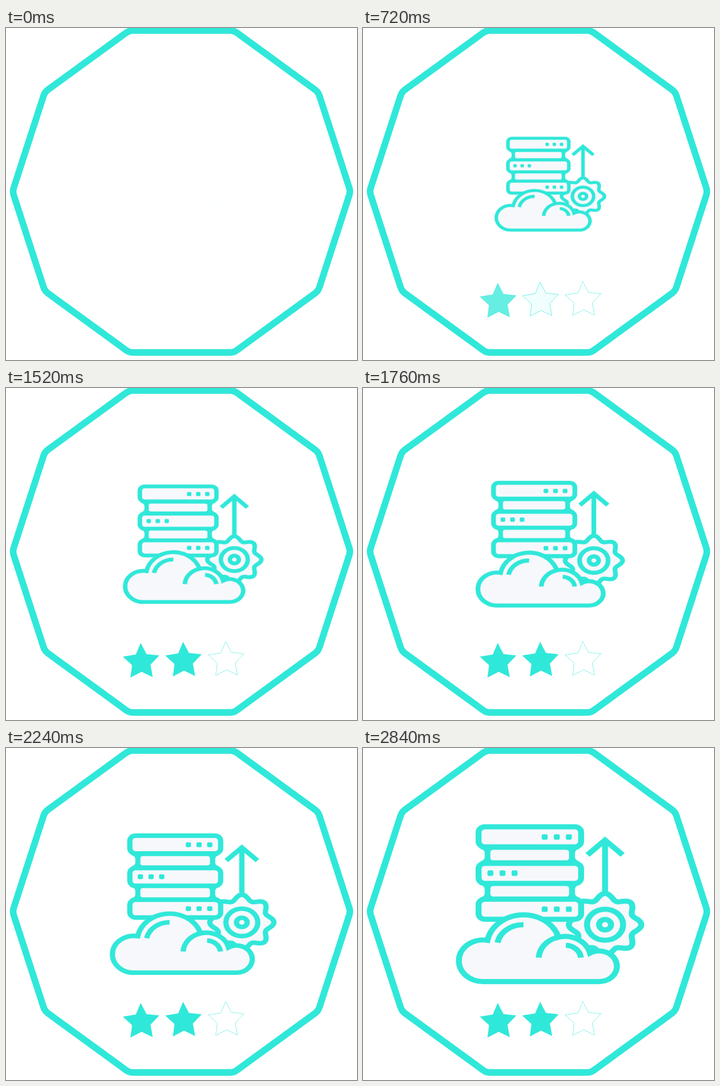
These frames come from a looping animation (770x727 px, 2.88 s). An HTML page:

```html
<!DOCTYPE html>
<html lang="en">
<head>
<meta charset="utf-8">
<title>Cloud server badge</title>
<style>
  html, body { margin: 0; width: 100%; height: 100%; overflow: hidden; background: #fff; }
  svg { display: block; width: 100vw; height: 100vh; --teal: #30e8d9; --pale: #f7f8fc; }

  .line { fill: none; stroke: var(--teal); stroke-width: 13; }
  .shape { fill: var(--pale); stroke: var(--teal); stroke-width: 13; }
  .solid { fill: var(--teal); }
  .pale { fill: var(--pale); }
  #frame { stroke-width: 14.5; }

  .icon { animation: grow 2880ms linear infinite, appear 2880ms linear infinite; }
  @keyframes grow {
    from { transform: translate(412px, 342px) scale(.4547, .391); }
    to   { transform: translate(412px, 342px) scale(1.0077, .8666); }
  }
  @keyframes appear { 0% { opacity: 0; } 7% { opacity: 1; } }

  .star { fill: var(--teal); fill-opacity: 0; stroke: var(--teal); stroke-width: .8; }
  .star.a { animation: outlineA 2880ms linear infinite, fillA 2880ms linear infinite; }
  .star.b { animation: outlineB 2880ms linear infinite, fillB 2880ms linear infinite; }
  .star.c { animation: outlineC 2880ms linear infinite; stroke-width: .7; }
  @keyframes outlineA { 0% { stroke-opacity: 0; } 10.4% { stroke-opacity: 1; } }
  @keyframes outlineB { 0%, 2.8% { stroke-opacity: 0; } 13.2% { stroke-opacity: 1; } }
  @keyframes outlineC { 0%, 8.3% { stroke-opacity: 0; } 20.8%, 100% { stroke-opacity: 1; } }
  @keyframes fillA { 0%, 17.4% { fill-opacity: 0; } 27.8%, 100% { fill-opacity: 1; } }
  @keyframes fillB { 0%, 24.3% { fill-opacity: 0; } 34.7%, 100% { fill-opacity: 1; } }
</style>
</head>
<body>
<svg viewBox="0 0 770 727" preserveAspectRatio="none">
  <defs>
    <path id="star" d="M295.5 559 308 583 335.5 586 316.5 606 321.5 632.5 297.5 621 273.5 633.5 277 607 257 588.5 285 584Z"/>
    <rect id="box" x="-158.5" y="-25.6" width="225" height="51.2" rx="14"/>
    <g id="dots">
      <rect x="-33" y="-7" width="13" height="14" rx="4"/>
      <rect x="-6.5" y="-7" width="13" height="14" rx="4"/>
      <rect x="20" y="-7" width="13" height="14" rx="4"/>
    </g>
    <g id="link">
      <path class="solid" d="M-160-16Q-145-16-145-4V4Q-145 16-160 16H68Q53 16 53 4V-4Q53-16 68-16Z"/>
      <rect class="pale" x="-132.5" y="-13.4" width="172.5" height="26.8" rx="6"/>
    </g>
  </defs>

  <path id="frame" class="line"/>

  <g class="icon">
    <path class="pale" d="M-10 30H60V85H-10Z"/>
    <path class="line" d="M119 -20V-160M80.5 -125.5 119 -163 157.5 -125.5"/>
    <g transform="translate(119 52.3)">
      <path id="gear" class="shape"/>
      <circle class="line" r="39.5"/>
      <circle class="line" r="13.2"/>
    </g>

    <use href="#box" class="shape" y="-171.5"/>
    <use href="#box" class="shape" y="-78.5"/>
    <use href="#box" class="shape" y="12.8"/>
    <use href="#link" y="-125"/>
    <use href="#link" y="-33"/>
    <use href="#dots" class="solid" x="13" y="-171"/>
    <use href="#dots" class="solid" x="-106" y="-79"/>
    <use href="#dots" class="solid" x="13" y="12.8"/>

    <path class="shape" d="M-139 92A53 53 0 1 0-145.5 197H106.5A39 39 0 1 0 86 124.5A56.6 56.6 0 0 0 14 84.7V76A80.5 80.5 0 0 0-139 92Z"/>
    <path class="line" d="M-26.5 136A56.6 56.6 0 0 1 14 84.7M-117 98A57 57 0 0 1-60 52.3M33 104.5A35 35 0 0 1 66 136"/>
  </g>

  <use href="#star" class="star a"/>
  <use href="#star" class="star b" x="93" y="-2.5"/>
  <use href="#star" class="star c" x="186.5" y="-4"/>
</svg>

<script>
  const points = (count, radius) => Array.from({ length: count }, (_, i) => {
    const angle = i * 2 * Math.PI / count;
    const r = radius(angle);
    return [r * Math.cos(angle), r * Math.sin(angle)];
  });
  const setPath = (id, d) => document.getElementById(id).setAttribute('d', d);

  // Decagon whose corners are softened by quadratic curves.
  const corners = points(10, () => 370.7).map(([x, y]) => [385 + x, 358 + y]);
  const toward = (from, to, length) => {
    const k = length / Math.hypot(to[0] - from[0], to[1] - from[1]);
    return from.map((value, i) => value + (to[i] - value) * k);
  };
  setPath('frame', corners.map((corner, i) => {
    const start = toward(corner, corners[(i + 9) % 10], 9);
    const end = toward(corner, corners[(i + 1) % 10], 9);
    return `${i ? 'L' : 'M'}${start}Q${corner} ${end}`;
  }).join('') + 'Z');

  // Eight rounded teeth.
  const rim = points(192, angle => 71.8 + 7.7 * Math.cos(8 * angle));
  setPath('gear', 'M' + rim.map(p => p.map(n => n.toFixed(2))).join('L') + 'Z');
</script>
</body>
</html>
```
